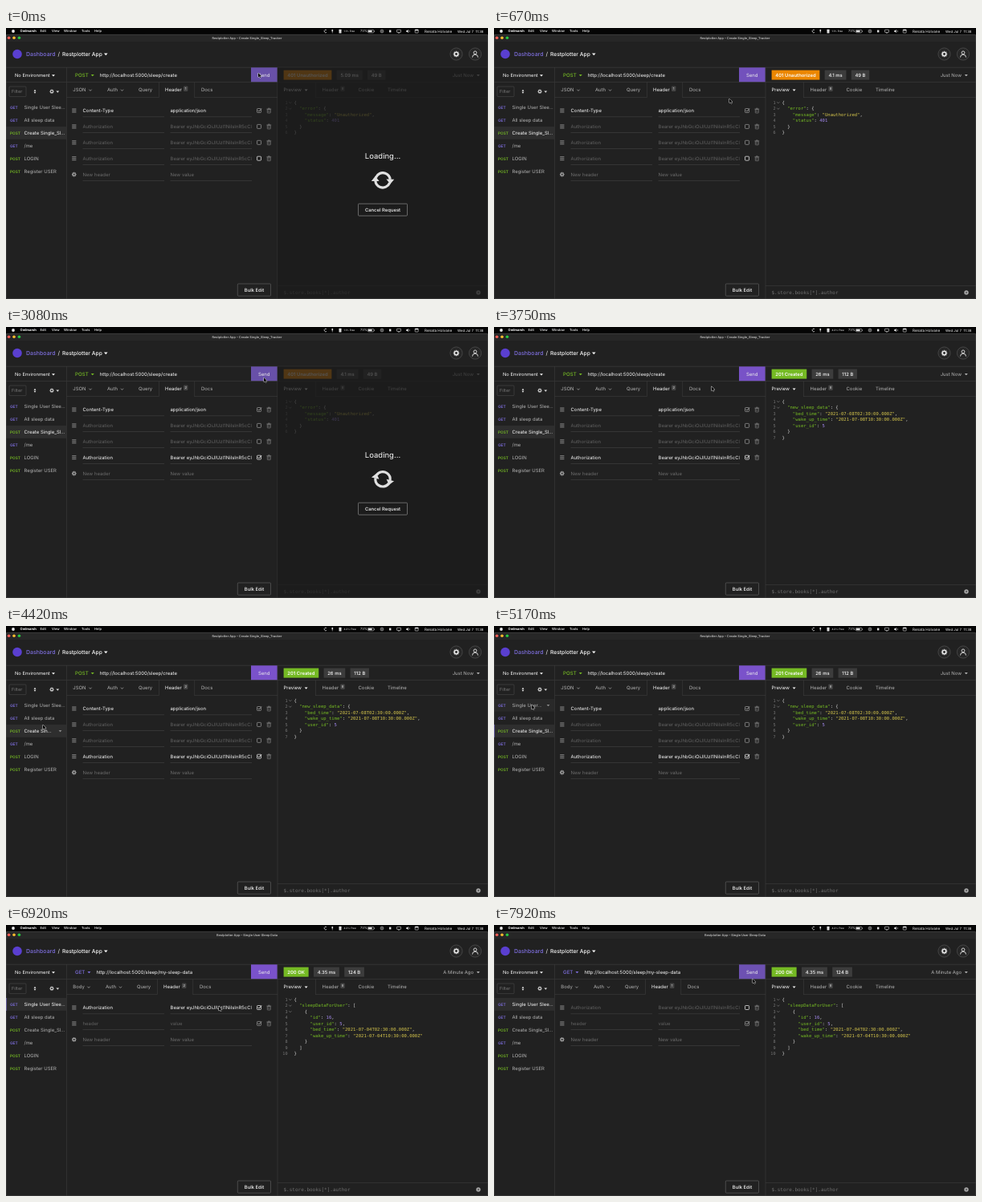
Write an HTML page with a canvas that moves like this. It is 600 px wide and 338 px high and loops after 8000 ms.

```html
<!DOCTYPE html>
<html lang="en">
<head>
<meta charset="utf-8">
<title>API client</title>
<style>
html, body { margin: 0; width: 100%; height: 100%; overflow: hidden; background: #212121; }
canvas { display: block; width: 100vw; height: 100vh; }
</style>
</head>
<body>
<canvas id="stage"></canvas>
<script>
const W = 600, H = 338, LOOP = 8000;
const canvas = document.getElementById('stage');
const ctx = canvas.getContext('2d');

const SANS = 'Inter, "Open Sans", sans-serif';
const MONO = '"DejaVu Sans Mono", monospace';
const APP = 'Restplotter App';
const TOKEN = 'Bearer eyJhbGciOiJIUzI1NiIsInR5cCI6IkpXVCJ9';
const C = {
  bg: '#212121', line: '#3d3d3d', faint: '#626262', grey: '#8c8c8c', soft: '#b4b4b4',
  white: '#fafafa', green: '#75ba24', purple: '#7f6fe0', orange: '#ec8702', yellow: '#d8c84d'
};

const SWITCH = 5350, CHECK = 1500, UNCHECK = 7330;
const FOCUS = [4650, UNCHECK]; // keyboard focus is in the sidebar
const LOADS = [[0, 350], [2950, 3290]];

// time, x, y of the pointer tip
const PATH = [
  [0, 314, 56], [300, 314, 56], [670, 293, 88], [1350, 314, 160], [2500, 314, 160],
  [2850, 321, 63], [3500, 321, 63], [4420, 46, 123.3], [4950, 44, 98], [5500, 52, 99],
  [5920, 67, 103.5], [6350, 67, 103.5], [7150, 314, 101], [7560, 314, 101], [7920, 322, 67], [8000, 322, 66]
];
// time, hover amount of the Send button
const HOVER = [[0, 1], [450, 1], [850, 0], [2650, 0], [2850, 1], [3550, 1], [3800, 0], [7780, 0], [8000, 1]];

const SIDEBAR = [
  ['GET', 'Single User Slee...', 'Single User...'],
  ['GET', 'All sleep data'],
  ['POST', 'Create Single_Sl...', 'Create Sin...'],
  ['GET', '/me'],
  ['POST', 'LOGIN'],
  ['POST', 'Register USER']
];

const DENIED = ['{', '  "error": {', '    "message": "Unauthorized",', '    "status": 401', '  }', '}'];
const CREATED = ['{', '  "new_sleep_data": {', '    "bed_time": "2021-07-08T02:30:00.000Z",',
  '    "wake_up_time": "2021-07-08T10:30:00.000Z",', '    "user_id": 5', '  }', '}'];
const LISTED = ['{', '  "sleepDataForUser": [', '    {', '      "id": 16,', '      "user_id": 5,',
  '      "bed_time": "2021-07-04T02:30:00.000Z",', '      "wake_up_time": "2021-07-04T10:30:00.000Z"', '    }', '  ]', '}'];

// Set type ten times larger and scale down, so small sizes keep true advances.
const ZOOM = 10;
function setFont(size, weight, family = SANS) {
  ctx.font = `${weight} ${size * ZOOM}px ${family}`;
  ctx.textRendering = 'geometricPrecision';
}
const textWidth = s => ctx.measureText(s).width / ZOOM;

function text(s, x, y, color = C.white, size = 5.95, weight = 400, align = 'left', family = SANS) {
  setFont(size, weight, family);
  ctx.fillStyle = color;
  ctx.textAlign = align;
  ctx.save();
  ctx.translate(x, y + size * 0.36);
  ctx.scale(1 / ZOOM, 1 / ZOOM);
  ctx.fillText(s, 0, 0);
  ctx.restore();
  return textWidth(s);
}
function rect(x, y, w, h, color) {
  ctx.fillStyle = color;
  ctx.fillRect(x, y, w, h);
}
function box(x, y, w, h, r, fill, stroke, lw = 0.6) {
  ctx.beginPath();
  ctx.roundRect(x, y, w, h, r);
  if (fill) { ctx.fillStyle = fill; ctx.fill(); }
  if (stroke) { ctx.strokeStyle = stroke; ctx.lineWidth = lw; ctx.stroke(); }
}
function dot(x, y, r, fill, stroke, lw = 0.6) {
  box(x - r, y - r, 2 * r, 2 * r, r, fill, stroke, lw);
}
function stroke(points, color, lw = 0.7) {
  ctx.beginPath();
  points.forEach(([x, y]) => ctx.lineTo(x, y));
  ctx.strokeStyle = color;
  ctx.lineWidth = lw;
  ctx.stroke();
}
function poly(points, color) {
  ctx.beginPath();
  points.forEach(([x, y]) => ctx.lineTo(x, y));
  ctx.closePath();
  ctx.fillStyle = color;
  ctx.fill();
}
function caret(x, y, color = C.white, r = 2) {
  poly([[x - r, y - r / 2], [x + r, y - r / 2], [x, y + r / 2 + 0.3]], color);
}
function chevron(x, y, color) {
  stroke([[x - 1.6, y - 0.8], [x, y + 0.9], [x + 1.6, y - 0.8]], color);
}
function gear(x, y, r, color) {
  for (let i = 0; i < 8; i++) {
    const a = i * Math.PI / 4, c = Math.cos(a), s = Math.sin(a);
    stroke([[x + c * r * 0.7, y + s * r * 0.7], [x + c * r, y + s * r]], color, r * 0.4);
  }
  dot(x, y, r * 0.58, null, color, r * 0.38);
}
function track(keys, t) {
  let i = 1;
  while (i < keys.length - 1 && t > keys[i][0]) i++;
  const a = keys[i - 1], b = keys[i];
  const p = Math.min(1, Math.max(0, (t - a[0]) / (b[0] - a[0])));
  const e = p * p * (3 - 2 * p);
  return a.slice(1).map((v, k) => v + (b[k + 1] - v) * e);
}
const within = (t, [a, b]) => t >= a && t < b;

function menuBar(t, title) {
  rect(0, 0, W, 8, '#050505');
  dot(9, 4, 1.9, '#e8e8e8');
  text('Owlmarsh', 17.5, 4, C.white, 4.1, 700);
  [['Edit', 42.5], ['View', 57], ['Window', 72], ['Tools', 94], ['Help', 110]]
    .forEach(([s, x]) => text(s, x, 4, C.white, 4.1, 500));

  const ink = '#dedede';
  ctx.beginPath();
  ctx.arc(398, 4, 1.8, 1, 5.3);
  ctx.strokeStyle = ink;
  ctx.lineWidth = 0.8;
  ctx.stroke();
  box(405.5, 1.8, 1.6, 3, 0.8, ink);
  stroke([[406.3, 5], [406.3, 6.4]], ink, 0.5);
  box(414.5, 1.8, 3, 4.6, 0.5, ink);
  text(t < 3500 ? '1.1% Free' : '4.2% Free', 420.5, 4.2, ink, 3.1, 500);
  text('73%', 441, 4, ink, 4.1);
  box(450.3, 2.3, 7.6, 3.6, 1, null, ink, 0.5);
  rect(451, 3, 4.6, 2.2, ink);
  rect(458.4, 3.4, 0.6, 1.4, ink);
  dot(468, 4, 1.9, null, ink);
  dot(468, 4, 0.7, ink);
  rect(477, 2.6, 2.4, 2.8, ink);
  box(486.5, 2.2, 5, 3.2, 0.5, null, ink);
  rect(488, 5.8, 2, 0.6, ink);
  poly([[498, 3.3], [499.2, 3.3], [500.8, 1.9], [500.8, 6.1], [499.2, 4.8], [498, 4.8]], ink);
  stroke([[502, 2.7], [502.6, 4], [502, 5.3]], ink, 0.5);
  box(509.2, 2, 4, 4, 0.5, null, ink);
  rect(509.2, 2, 4, 1.3, ink);
  text('Renata Holvane', 521, 4, C.white, 4.6);
  text('Wed Jul 7  11:38', 562, 4, C.white, 4.3);

  rect(0, 8, W, 9, '#272727');
  ['#fe5f57', '#febc2e', '#28c840'].forEach((c, i) => dot(3.6 + i * 6.4, 12.3, 1.8, c));
  text(title, 300, 12.4, '#bdbdbd', 3.9, 600, 'center');
}

function header() {
  rect(0, 48.8, W, 0.7, C.line);
  dot(14, 32.5, 5.8, '#5a3fd0');
  const w = text('Dashboard', 25, 32.5, C.purple, 7, 500);
  text('/', 25 + w + 3, 32.5, C.white, 7);
  const a = text(APP, 70, 32.5, C.white, 6.7, 500);
  caret(70 + a + 4.5, 32.7, C.white, 2.3);

  dot(560.5, 32.5, 7.6, '#262626', '#5c5c5c');
  gear(560.5, 32.5, 3.7, '#e6e6e6');
  dot(584, 32.5, 7.6, '#262626', '#5c5c5c');
  dot(584, 30.8, 1.9, null, '#e6e6e6', 0.9);
  ctx.beginPath();
  ctx.arc(584, 36.6, 3.5, Math.PI, 0);
  ctx.stroke();
}

function sidebar(t, selected, mx, my) {
  text('No Environment', 11, 59, C.white, 5.8);
  caret(59, 59.2);
  rect(0, 67.3, 75, 0.6, C.line);
  box(4, 73, 21, 12.6, 1, null, '#4a4a4a');
  text('Filter', 7, 79.3, '#777', 5.6);
  poly([[34.6, 78.7], [37.4, 78.7], [36, 76.7]], C.white);
  poly([[34.6, 79.8], [37.4, 79.8], [36, 81.8]], C.white);
  gear(57, 79.2, 2.6, '#dedede');
  caret(64.3, 79.4, '#dedede', 1.9);

  const over = mx < 75 ? Math.floor((my - 91) / 16) : -1;
  SIDEBAR.forEach(([method, name, short], i) => {
    const y = 99 + i * 16, lit = i === selected, hot = i === over;
    if (lit || hot) rect(0, y - 8, 75, 15.8, lit ? '#2e2e2e' : '#292929');
    if (lit && within(t, FOCUS)) rect(0, y - 8, 1, 15.8, C.purple);
    text(method, 5, y, method === 'GET' ? C.purple : C.green, 4.8, 600);
    text(hot && short || name, 22.5, y, lit ? C.white : C.soft);
    if (hot) caret(67.5, y, C.grey, 1.9);
  });
}

function badge(n, x) {
  box(x, 72.6, 5.4, 6.4, 1, '#454545');
  text(n, x + 2.7, 75.9, '#dcdcdc', 4.2, 400, 'center');
}

function fieldLines(y) {
  rect(95.5, y + 7.6, 101.5, 0.5, '#484848');
  rect(204.5, y + 7.6, 101.5, 0.5, '#484848');
}
function trash(x, y) {
  box(x - 2, y - 1.6, 4, 4.6, 0.5, null, C.grey);
  stroke([[x - 2.9, y - 1.9], [x + 2.9, y - 1.9]], C.grey);
  stroke([[x - 1.1, y - 2.8], [x + 1.1, y - 2.8]], C.grey);
  [-0.7, 0.7].forEach(d => stroke([[x + d, y - 0.6], [x + d, y + 2]], C.grey, 0.4));
}
function headerRow(y, { name, value = TOKEN, on, placeholder, bright }) {
  const ink = on && !placeholder ? C.white : C.faint;
  [-2, 0, 2].forEach(d => stroke([[82.2, y + d], [87.4, y + d]], '#b5b5b5', 0.7));
  text(name, 95.5, y, ink);
  ctx.save();
  ctx.beginPath();
  ctx.rect(204, y - 8, 101.8, 16);
  ctx.clip();
  text(value, 204.5, y, ink);
  ctx.restore();
  fieldLines(y);
  const mark = bright ? C.white : '#a0a0a0';
  box(312.5, y - 2.5, 5, 5, 0.8, null, mark, 0.7);
  if (on) stroke([[313.6, y - 0.3], [314.9, y + 1.1], [318, y - 2.5]], mark, 0.9);
  trash(327.3, y);
}

function request(t, listing) {
  const method = listing ? 'GET' : 'POST', tint = listing ? C.purple : C.green;
  const w = text(method, 86, 58.7, tint, 6.2, 500);
  caret(86 + w + 5, 58.9, tint);
  text('http://localhost:5000/sleep/' + (listing ? 'my-sleep-data' : 'create'), 86 + w + 14, 58.7);

  const h = track(HOVER, t)[0];
  rect(305, 49.3, 32.8, 18.2, `rgb(${122 - 18 * h},${82 - 2 * h},${202 - 34 * h})`);
  text('Send', 321.2, 58.7, '#ececec', 6, 400, 'center');

  const dx = listing ? -2 : 0, left = 190 + dx, right = 234.5 + dx;
  rect(75.5, 67.3, 262, 0.6, C.line);
  rect(75.5, 86.4, left - 75.5, 0.6, C.line);
  rect(right, 86.4, 338 - right, 0.6, C.line);
  rect(left, 67.5, 0.6, 19.3, C.line);
  rect(right, 67.5, 0.6, 19.3, C.line);
  text(listing ? 'Body' : 'JSON', 83.3, 77.3, C.soft);
  chevron(listing ? 103 : 105, 77.5, C.soft);
  text('Auth', 126 + dx, 77.3, C.soft);
  chevron(144.5 + dx, 77.5, C.soft);
  text('Query', 165 + dx, 77.3, C.soft);
  text('Header', 198 + dx, 77.3);
  text('Docs', 243 + dx, 77.3, C.soft);
  const two = listing ? t < UNCHECK : t >= CHECK;
  badge(two ? '2' : '1', 221 + dx);

  const auth = { name: 'Authorization' };
  const toggled = { ...auth, on: two, bright: true };
  const rows = listing
    ? [toggled, { name: 'header', value: 'value', on: true, placeholder: true }]
    : [{ name: 'Content-Type', value: 'application/json', on: true }, auth, auth, toggled];
  rows.forEach((row, i) => headerRow(103 + i * 19.9, row));
  const y = 103 + rows.length * 19.9;
  gear(84.7, y, 2.8, '#b5b5b5');
  text('New header', 95.5, y, '#6c6c6c');
  text('New value', 204.5, y, '#6c6c6c');
  fieldLines(y);

  box(288.3, 319, 41.2, 15.2, 1, null, '#666');
  text('Bulk Edit', 309, 326.6, C.white, 5.9, 500, 'center');
}

function code(lines) {
  lines.forEach((line, i) => {
    const y = 93 + i * 7.5;
    text(i + 1, 350.6, y, '#777', 5.2, 400, 'right', MONO);
    if (/[{[]$/.test(line)) chevron(353.8, y, '#777');
    let x = 358.5;
    for (const [part] of line.matchAll(/"[^"]*"|\d+|[^"\d]+/g)) {
      const key = line.includes(part + ':');
      const color = part[0] === '"' ? (key ? C.green : C.yellow) : /^\d/.test(part) ? '#a58af0' : '#d6d6d6';
      x += text(part, x, y, color, 5.55, 400, 'left', MONO);
    }
  });
}

function pill(s, x, fill, weight) {
  setFont(5.9, weight);
  const w = textWidth(s) + 9.4;
  rect(x, 52.6, w, 12, fill);
  text(s, x + 4.7, 58.7, C.white, 5.9, weight);
  return x + w + 6.3;
}

function response(t, listing) {
  const [status, time, size, lines] =
    listing ? ['200 OK', '4.35 ms', '124 B', LISTED]
    : t >= LOADS[1][1] ? ['201 Created', '26 ms', '112 B', CREATED]
    : ['401 Unauthorized', t < LOADS[0][1] ? '5.09 ms' : '4.1 ms', '49 B', DENIED];
  let x = pill(status, 345.6, lines === DENIED ? C.orange : C.green, 600);
  x = pill(time, x, '#3c3c3c', 500);
  pill(size, x, '#3c3c3c', 500);
  text(listing ? 'A Minute Ago' : 'Just Now', 582, 58.7, C.soft, 5.9, 400, 'right');
  caret(587.8, 58.9, C.soft);

  rect(338, 67.3, 262, 0.6, C.line);
  rect(385, 67.5, 0.6, 19.3, C.line);
  rect(385, 86.4, 215, 0.6, C.line);
  text('Preview', 345.5, 77.3);
  caret(373.6, 77.5);
  text('Header', 393.5, 77.3, C.soft);
  badge('8', 416.3);
  text('Cookie', 438.5, 77.3, C.soft);
  text('Timeline', 475, 77.3, C.soft);
  code(lines);

  rect(338, 321.3, 262, 0.6, C.line);
  text('$.store.books[*].author', 345.5, 330, '#707070', 6, 400, 'left', MONO);
  dot(588, 330, 2.7, '#a8a8a8');
  text('?', 588, 330, C.bg, 4.2, 700, 'center');
}

function spinner(x, y, angle) {
  const ink = '#e0e0e0';
  ctx.save();
  ctx.translate(x, y);
  ctx.rotate(angle);
  for (let k = 0; k < 2; k++) {
    ctx.beginPath();
    ctx.arc(0, 0, 9.2, Math.PI + 0.35, Math.PI * 2 - 0.1);
    ctx.strokeStyle = ink;
    ctx.lineWidth = 3.2;
    ctx.stroke();
    poly([[4.4, -1.2], [14.2, -1.2], [9.3, 5]], ink);
    ctx.rotate(Math.PI);
  }
  ctx.restore();
}

function loading(t) {
  rect(338, 49.3, 262, 289, 'rgba(26,26,26,.74)');
  text('Loading...', 469, 160, C.white, 9.5, 400, 'center');
  spinner(469, 189.8, t / 2000 * Math.PI * 2);
  box(438.5, 219.2, 61, 15, 1, null, '#9a9a9a');
  text('Cancel Request', 469, 226.7, C.white, 5.9, 500, 'center');
}

function pointer(x, y) {
  ctx.save();
  ctx.translate(x, y);
  ctx.beginPath();
  [[0, 0], [0, 5.4], [1.3, 4.3], [2.2, 6.2], [3.1, 5.8], [2.3, 4], [3.9, 3.9]]
    .forEach(p => ctx.lineTo(...p));
  ctx.closePath();
  ctx.lineJoin = 'round';
  ctx.strokeStyle = '#e8e8e8';
  ctx.lineWidth = 0.9;
  ctx.stroke();
  ctx.fillStyle = '#050505';
  ctx.fill();
  ctx.restore();
}

function draw(t) {
  const listing = t >= SWITCH;
  const [mx, my] = track(PATH, t);
  rect(0, 0, W, H, C.bg);
  menuBar(t, `${APP} – ${listing ? 'Single User Sleep Data' : 'Create Single_Sleep_Tracker'}`);
  header();
  sidebar(t, listing ? 0 : 2, mx, my);
  request(t, listing);
  response(t, listing);
  rect(75, 49, 0.6, 289, C.line);
  rect(337.7, 49, 0.6, 289, C.line);
  if (LOADS.some(span => within(t, span))) loading(t);
  box(0.3, 8.3, W - 0.6, H - 8.6, 1.5, null, '#4c4c4c');
  pointer(mx, my);
}

function resize() {
  const dpr = window.devicePixelRatio || 1;
  canvas.width = Math.round(innerWidth * dpr);
  canvas.height = Math.round(innerHeight * dpr);
}
addEventListener('resize', resize);
resize();

const start = performance.now();
function frame() {
  ctx.setTransform(canvas.width / W, 0, 0, canvas.height / H, 0, 0);
  draw((performance.now() - start) % LOOP);
  requestAnimationFrame(frame);
}
frame();
</script>
</body>
</html>
```
